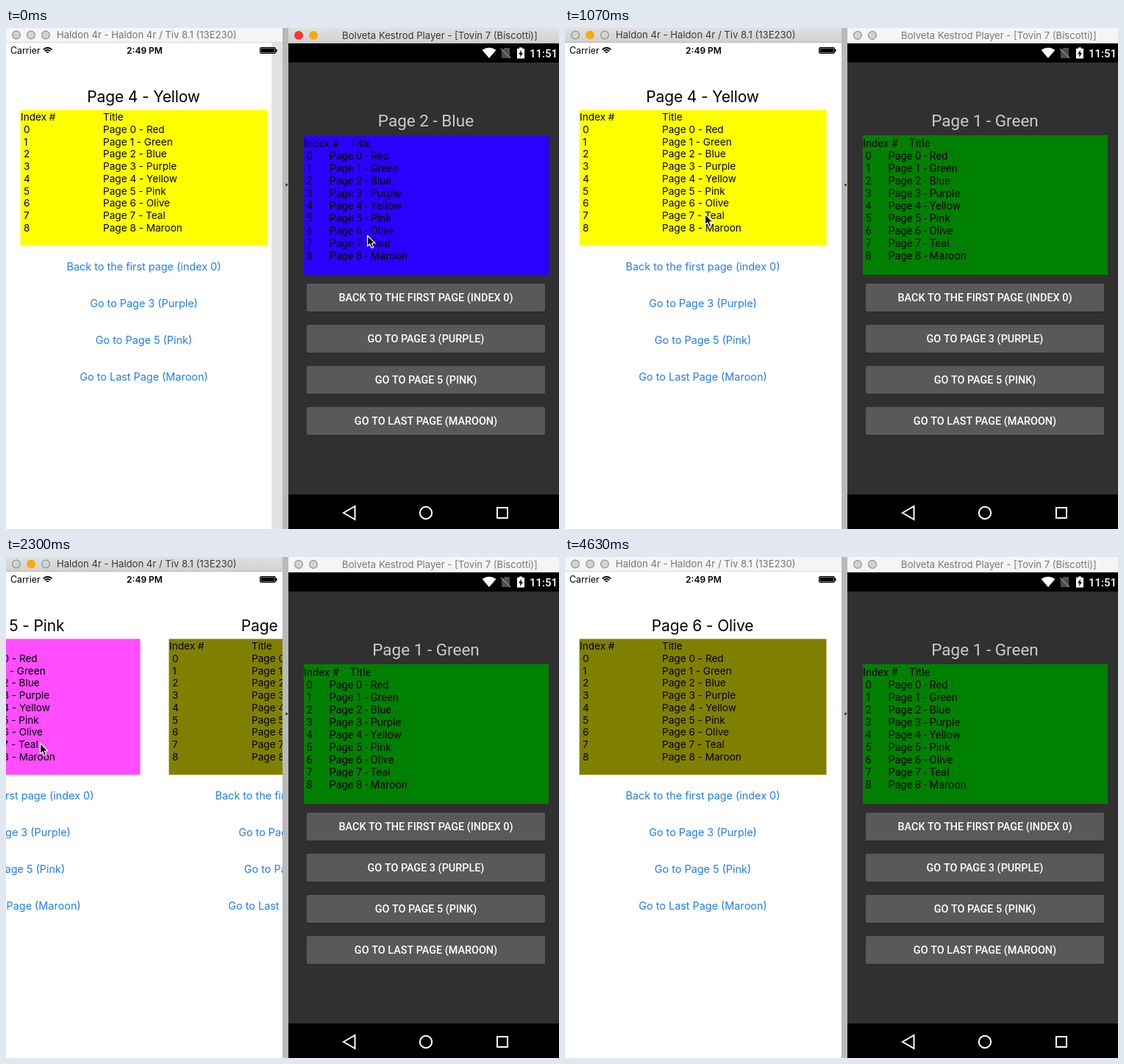
An HTML page with a canvas that plays this animation: 752 by 682 pixels, repeating every 4730 ms.

```html
<!DOCTYPE html>
<html lang="en">
<head>
<meta charset="utf-8">
<title>Paged carousel on two phones</title>
<style>
html, body { margin: 0; width: 100%; height: 100%; overflow: hidden; background: #fff; }
canvas { display: block; width: 752px; height: 682px; }
</style>
</head>
<body>
<canvas id="stage"></canvas>
<script>
const W = 752, H = 682, LOOP = 4730, TICK = 88.6;
const LIGHT_W = 375, DARK_W = 368;
const FOCUS = 970, BLUR = 4600;
const canvas = document.getElementById('stage');
const ratio = window.devicePixelRatio || 1;
canvas.width = W * ratio;
canvas.height = H * ratio;
const ctx = canvas.getContext('2d');
ctx.scale(ratio, ratio);

const NAMES = ['Red', 'Green', 'Blue', 'Purple', 'Yellow', 'Pink', 'Olive', 'Teal', 'Maroon'];
const FILLS = { 1: '#008000', 2: '#2b00ff', 4: '#ffff00', 5: '#ff4dff', 6: '#808000' };
const LINKS = ['Back to the first page (index 0)', 'Go to Page 3 (Purple)', 'Go to Page 5 (Pink)', 'Go to Last Page (Maroon)'];
const SANS = 'Inter, sans-serif', ROBOTO = 'Roboto, sans-serif';
const pageName = n => `Page ${n} - ${NAMES[n]}`;

const clamp = u => Math.max(0, Math.min(1, u));
const smooth = u => u * u * (3 - 2 * u);
const quintOut = u => 1 - Math.pow(1 - u, 5);

// Where the mouse stops: time, x, y.
const STOPS = [
  [0, 491, 282], [354, 621, 280], [532, 174, 258], [FOCUS, 190, 253], [1150, 190, 253], [1580, 36, 253],
  [1907, 219, 253], [2040, 219, 253], [2304, 46, 253], [2747, 177, 432], [3278, 211, 493], [3544, 436, 646]
];

function mouse(t) {
  const i = STOPS.findIndex(s => s[0] > t);
  if (i < 1) return STOPS[STOPS.length - 1].slice(1);
  const [t0, x0, y0] = STOPS[i - 1], [t1, x1, y1] = STOPS[i];
  const u = smooth((t - t0) / (t1 - t0));
  return [x0 + (x1 - x0) * u, y0 + (y1 - y0) * u];
}

// The page follows the mouse until release, then settles on a full page.
function swipe(t, press, release, width, duration, ease) {
  const held = Math.max(press, Math.min(t, release));
  const drag = mouse(held)[0] - mouse(press)[0];
  const u = clamp((t - release) / duration);
  return Math.round(drag + (width - drag) * ease(u));
}

const darkOffset = t => swipe(t, 0, 354, DARK_W, 640, quintOut);
const lightOffset = t => swipe(t, 1150, 1580, -LIGHT_W, 400, smooth) + swipe(t, 2040, 2304, -LIGHT_W, 400, smooth);

function box(x, y, w, h, color) {
  ctx.fillStyle = color;
  ctx.fillRect(x, y, w, h);
}

function roundBox(x, y, w, h, r, fill, stroke) {
  ctx.beginPath();
  ctx.roundRect(x, y, w, h, r);
  paint(fill, stroke, 1);
}

function text(str, x, y, font, color, align = 'left', spacing = 0) {
  ctx.font = font;
  ctx.fillStyle = color;
  ctx.textAlign = align;
  ctx.letterSpacing = spacing + 'px';
  ctx.fillText(str, x, y);
}

function shape(points, fill, stroke, width = 1) {
  ctx.beginPath();
  points.forEach(([x, y]) => ctx.lineTo(x, y));
  ctx.closePath();
  paint(fill, stroke, width);
}

function disc(x, y, r, fill, stroke, width = 1) {
  ctx.beginPath();
  ctx.arc(x, y, r, 0, 7);
  paint(fill, stroke, width);
}

function paint(fill, stroke, width) {
  ctx.lineWidth = width;
  if (fill) { ctx.fillStyle = fill; ctx.fill(); }
  if (stroke) { ctx.strokeStyle = stroke; ctx.stroke(); }
}

function clipped(x, y, w, h, draw) {
  ctx.save();
  ctx.beginPath();
  ctx.rect(x, y, w, h);
  ctx.clip();
  draw();
  ctx.restore();
}

function titleBar(x, w, h, active) {
  const g = ctx.createLinearGradient(0, 0, 0, h);
  g.addColorStop(0, active ? '#e0e0e0' : '#f6f6f6');
  g.addColorStop(1, active ? '#d1d1d1' : '#f4f4f4');
  box(x, 0, w, h, g);
  box(x, h - 1, w, 1, active ? '#b8b8b8' : '#d8d8d8');
}

function lightDot(x, y, color) {
  if (color) disc(x, y, 6, color);
  else disc(x, y, 5.4, '#d3d3d3', '#8f8f8f', 1.2);
}

function wifiFan(x, y) {
  for (const r of [2, 5, 8]) {
    ctx.beginPath();
    ctx.arc(x, y, r, -Math.PI * 0.76, -Math.PI * 0.24);
    paint(null, '#000', 1.8);
  }
}

function battery(x, y) {
  roundBox(x + 0.5, y + 0.5, 21, 8, 1.5, '#777', '#000');
  box(x + 2, y + 2, 18, 5, '#000');
  box(x + 22, y + 3, 1.5, 3.5, '#000');
}

function rows(x, y, pitch, numberX, titleX, font) {
  NAMES.forEach((_, i) => {
    text(i, x + numberX, y + i * pitch, font, '#000');
    text(pageName(i), x + titleX, y + i * pitch, font, '#000');
  });
}

function lightPage(n, x) {
  const font = `13.6px ${SANS}`;
  text(pageName(n), x + 187, 101, `21px ${SANS}`, '#000', 'center', -0.15);
  box(x + 19.5, 111.5, 336, 185, FILLS[n]);
  text('Index #', x + 20, 126, font, '#000');
  text('Title', x + 132, 126, font, '#000');
  rows(x, 143, 16.7, 24, 132, font);
  LINKS.forEach((s, i) => text(s, x + 187.5, 330 + i * 50, `14.4px ${SANS}`, '#207cf7', 'center'));
}

function darkPage(n, x) {
  const font = `14.6px ${ROBOTO}`;
  text(pageName(n), x + 187, 134, `22.5px ${ROBOTO}`, '#cbcbcb', 'center');
  box(x + 21, 146, 333, 190, FILLS[n]);
  text('Index #', x + 21, 162, font, '#000');
  text('Title', x + 84, 162, font, '#000');
  rows(x, 178.5, 17, 24.5, 55.5, font);
  LINKS.forEach((s, i) => {
    const y = 348 + i * 56;
    roundBox(x + 25, y + 1, 324, 38, 2, '#262626');
    roundBox(x + 25, y, 324, 38, 2, '#59595b');
    text(s.toUpperCase(), x + 187, y + 24, `500 14.4px ${ROBOTO}`, '#fff', 'center');
  });
}

function leftWindow(t, active) {
  titleBar(0, 376, 20, active);
  lightDot(14, 9.5);
  lightDot(34, 9.5, active && '#f6ab13');
  lightDot(54, 9.5);
  text('Haldon 4r - Haldon 4r / Tiv 8.1 (13E230)', 69, 14, `13.1px ${SANS}`, active ? '#3a3a3a' : '#747474');
  box(0, 20, 376, 662, '#fff');
  if (t < FOCUS) box(361, 20, 15, 662, '#e2e2e2');
  text('Carrier', 6, 35, `12.4px ${SANS}`, '#000');
  wifiFan(56.5, 35);
  text('2:49 PM', 188.5, 35, `600 12px ${SANS}`, '#000', 'center');
  battery(345, 26);
  const offset = lightOffset(t);
  clipped(0, 40, 376, 642, () => {
    for (let n = 4; n <= 6; n++) lightPage(n, (n - 4) * LIGHT_W + offset);
  });
}

function rightWindow(t, active) {
  titleBar(384, DARK_W, 21, active);
  lightDot(398, 10, active && '#f4382c');
  lightDot(418, 10, active && '#f6ab13');
  text('Bolveta Kestrod Player - [Tovin 7 (Biscotti)]', 590, 15, `13.1px ${SANS}`, active ? '#34383f' : '#777', 'center');
  box(384, 21, DARK_W, 661, '#000');
  box(384, 47, DARK_W, 588, '#303030');
  const x = 384 + darkOffset(t);
  clipped(384, 47, DARK_W, 588, () => {
    darkPage(2, x);
    darkPage(1, x - DARK_W);
  });
  statusIcons();
  shape([[459, 660], [474.5, 651], [474.5, 669]], null, '#fff', 2);
  disc(571, 660, 8.2, null, '#fff', 2);
  ctx.strokeRect(668, 653, 14, 14);
}

function statusIcons() {
  ctx.beginPath();
  ctx.moveTo(657, 41);
  ctx.lineTo(647.5, 30);
  ctx.quadraticCurveTo(657, 23.5, 666.5, 30);
  ctx.closePath();
  paint('#fff');
  shape([[674, 31], [678, 27], [685, 27], [685, 41], [674, 41]], '#4d4d4d');
  shape([[673, 28], [686, 41]], null, '#858585', 1.5);
  box(695, 28, 10, 13.5, '#fff');
  box(698, 26.5, 4, 2, '#fff');
  shape([[701, 30], [697, 35.5], [699.5, 35.5], [699, 40], [703, 34], [700.7, 34]], '#000');
  text('11:51', 750, 40, `500 15px ${ROBOTO}`, '#fff', 'right');
}

function gap() {
  box(376, 0, 8, H, '#b9b9b9');
  box(380, 212, 3, 3, '#17651f');
}

function pointer(t) {
  const away = t > 540 && t < FOCUS;
  if (away || t > 3600) return;
  ctx.save();
  ctx.translate(...mouse(t));
  ctx.lineJoin = 'round';
  shape([[0.5, 0.5], [0.5, 15], [3.8, 12], [6.2, 17.5], [8.8, 16.4], [6.4, 11], [11, 11]], '#000', '#fff', 1.2);
  ctx.restore();
}

function draw(now) {
  const t = Math.floor((now + 6) / TICK) * TICK;
  leftWindow(t, t >= FOCUS && t < BLUR);
  gap();
  rightWindow(t, t < FOCUS);
  pointer(t);
}

const start = performance.now();
function loop() {
  draw((performance.now() - start) % LOOP);
  requestAnimationFrame(loop);
}
loop();
</script>
</body>
</html>
```
